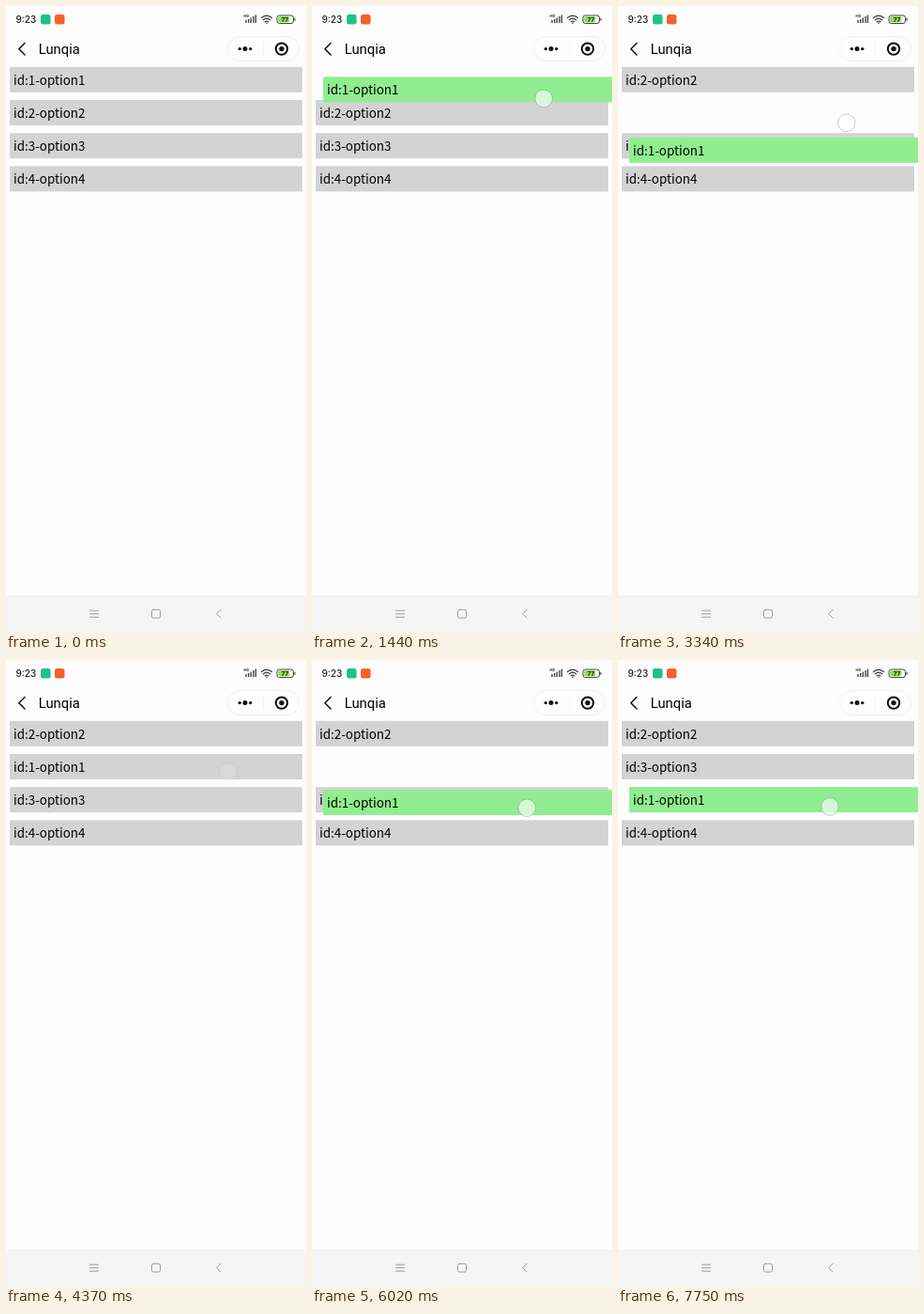
These frames come from a looping animation (320x666 px, 8 s). An HTML page:

```html
<!DOCTYPE html>
<html lang="en">
<head>
<meta charset="utf-8">
<title>Drag to reorder</title>
<style>
  html, body { margin: 0; width: 100%; height: 100%; overflow: hidden; background: #fdfdfd; }
  svg { display: block; width: 100vw; height: 100vh; }
  .row text { font: 13.4px "Noto Sans CJK SC", "Noto Sans", sans-serif; fill: #000; }
  .title { font: 14.8px Roboto, sans-serif; fill: #000; }
  .clock { font: 500 10px Inter, sans-serif; fill: #222; }
  .tiny { font: 700 4px Inter, sans-serif; fill: #333; }
  .charge { font: 700 6.5px Inter, sans-serif; fill: #222; text-anchor: middle; }
  .line { fill: none; stroke-linecap: round; stroke-linejoin: round; }
</style>
</head>
<body>
<svg viewBox="0 0 320 666">
  <rect width="320" height="666" fill="#fdfdfd"/>

  <text class="clock" x="10.5" y="17.6">9:23</text>
  <rect x="37" y="9" width="10.5" height="10.5" rx="2.5" fill="#1cc488"/>
  <rect x="52" y="9" width="10.5" height="10.5" rx="2.5" fill="#f4622a"/>
  <text class="tiny" x="253.5" y="12">HD</text>
  <path d="M256 18v-3M258.7 18v-4M261.3 18v-5.5M264 18v-7M266.4 18v-8.5" stroke="#444" stroke-width="1.4"/>
  <g class="line" stroke="#444" stroke-width="1.3">
    <path d="M272.5 12.6Q278 7.8 283.5 12.6M274.3 14.8Q278 11.6 281.7 14.8M276.2 16.8Q278 15.3 279.8 16.8"/>
  </g>
  <circle cx="278" cy="18.2" r=".8" fill="#444"/>
  <rect x="289" y="10" width="17.5" height="8.5" rx="2.5" fill="#fff" stroke="#444"/>
  <rect x="290.3" y="11.3" width="12" height="5.9" rx="1.3" fill="#8be04a"/>
  <path d="M308 12.8v3" stroke="#444" stroke-width="1.2"/>
  <text class="charge" x="297.5" y="16.6">77</text>

  <path class="line" d="M20 39.5L13.8 45.7L20 52" stroke="#111" stroke-width="1.5"/>
  <text class="title" x="34.8" y="51">Lunqia</text>
  <rect x="236.5" y="32.5" width="76" height="26" rx="13" fill="none" stroke="#f3f3f3"/>
  <path d="M274.5 38v15" stroke="#f3f3f3"/>
  <g fill="#111">
    <circle cx="249.3" cy="45.6" r="1.7"/>
    <circle cx="255" cy="45.6" r="2.5"/>
    <circle cx="260.7" cy="45.6" r="1.7"/>
    <circle cx="294" cy="45.6" r="2.7"/>
  </g>
  <circle cx="294" cy="45.6" r="6.2" fill="none" stroke="#111" stroke-width="2"/>

  <rect y="627" width="320" height="39" fill="#f5f5f5"/>
  <g class="line" stroke="#9c9c9c">
    <path d="M89.5 643.2h9M89.5 646.7h9M89.5 650.2h9M229 642.3L224.7 646.7L229 651"/>
    <rect x="155.5" y="642.3" width="9" height="8.8" rx="1.8"/>
  </g>

  <g id="list"></g>
  <circle id="touch" r="9.3" fill="#fff" fill-opacity=".62" stroke="#888" stroke-opacity=".6" stroke-width=".8"/>
</svg>
<script>
  const LOOP = 8000, TOP = 64.8, PITCH = 35.2;
  const LAG = 40, FADE = 200;
  const NS = "http://www.w3.org/2000/svg";
  const list = document.getElementById("list");
  const touch = document.getElementById("touch");

  // A touch goes down, picks the row up, reorders on release (swap), then the row settles.
  // path holds [time, drag distance]; drift is the sideways shift per pixel dragged.
  const gestures = [
    { down: 910, pick: 1280, swap: 3330, settle: 3370, x: 249, y: 84.3, drift: -.13,
      path: [[1280, 0], [1440, 14], [1800, 27], [2430, 37], [3330, 40]] },
    { down: 4330, pick: 4740, swap: 6680, settle: 6680, x: 237, y: 119, drift: -.2,
      path: [[5030, 0], [5200, 11], [5810, 37], [6640, 42]] },
    { down: 7300, pick: 7670, swap: Infinity, settle: Infinity, x: 226, y: 156, drift: 0,
      path: [[7670, 0]] }
  ];

  const add = (parent, tag, attrs) => {
    const node = document.createElementNS(NS, tag);
    for (const key in attrs) node.setAttribute(key, attrs[key]);
    return parent.appendChild(node);
  };
  const clamp = v => Math.max(0, Math.min(1, v));

  const rows = [4, 3, 2, 1].map(id => {
    const group = add(list, "g", { class: "row" });
    const box = add(group, "rect", { width: 312, height: 27 });
    add(group, "text", { x: 4, y: 19 }).textContent = `id:${id}-option${id}`;
    return { id, group, box };
  });

  function along(path, t) {
    const next = path.findIndex(([time]) => time > t);
    if (next === 0) return path[0][1];
    if (next < 0) return path[path.length - 1][1];
    const [t0, v0] = path[next - 1], [t1, v1] = path[next];
    return v0 + (v1 - v0) * (t - t0) / (t1 - t0);
  }

  function draw(t) {
    const moved = gestures.filter(g => t >= g.swap).length;
    const held = gestures.find(g => t >= g.pick && t < g.settle);
    for (const { id, group, box } of rows) {
      const active = id === 1 && held;
      const slot = id === 1 ? moved : id - 1 - (id - 2 < moved ? 1 : 0);
      const offset = active ? along(held.path, t - LAG) : 0;
      group.setAttribute("transform", `translate(${active ? 12 : 4} ${TOP + slot * PITCH + offset})`);
      box.setAttribute("fill", active ? "#90ee90" : "#d3d3d3");
    }

    const g = gestures.find(g => t >= g.down && t < g.swap + FADE);
    touch.setAttribute("opacity", g ? clamp((t - g.down) / FADE) * clamp(1 - (t - g.swap) / FADE) : 0);
    if (!g) return;
    const drag = along(g.path, t);
    touch.setAttribute("cx", g.x + drag * g.drift);
    touch.setAttribute("cy", g.y + drag);
  }

  const began = performance.now();
  function tick() {
    draw((performance.now() - began) % LOOP);
    requestAnimationFrame(tick);
  }
  tick();
</script>
</body>
</html>
```
